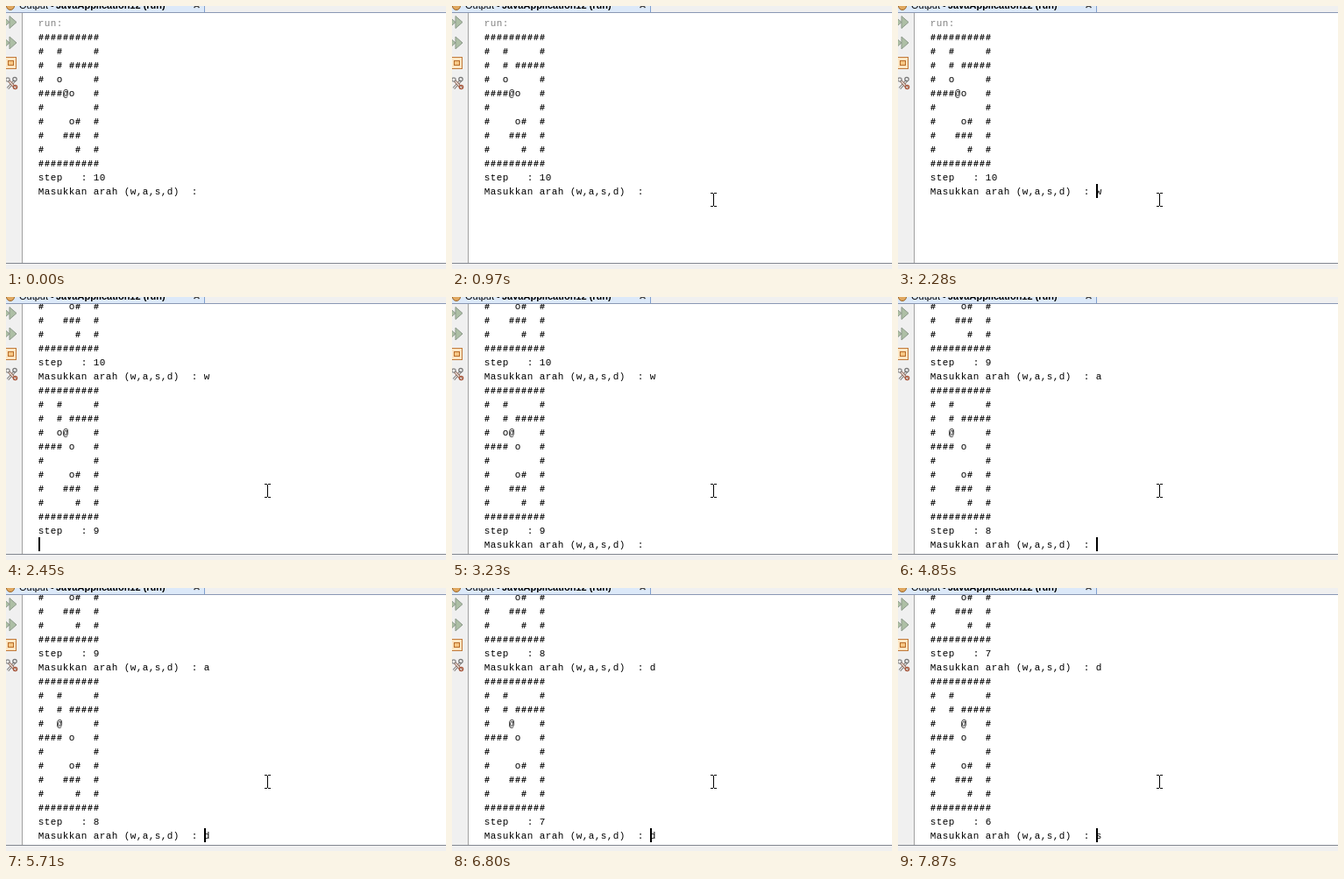
Recreate the animation shown at these times as an HTML page with a canvas. Size 502x300 px, loop 8000 ms.

```html
<!DOCTYPE html>
<html lang="id">
<head>
<meta charset="utf-8">
<title>Console puzzle</title>
<style>
html, body { margin: 0; width: 100%; height: 100%; overflow: hidden; background: #fff; }
canvas { display: block; }
</style>
</head>
<body>
<canvas id="stage" width="502" height="300"></canvas>
<script>
const ctx = document.getElementById('stage').getContext('2d');
const LOOP = 8000;
const LEFT = 37, TOP = 11, CELL = 7, LINE = 16;
const TEXT_FONT = '11px "Liberation Mono", monospace';
const WALL_FONT = 'bold 10px "Liberation Mono", monospace';
const PROMPT = 'Masukkan arah (w,a,s,d)  : ';
const END = PROMPT.length;
const KEYS = 'wadds';

// The two board rows that differ from move to move
const PLAY = [
  ['#  o     #', '####@o   #'],
  ['#  o@    #', '#### o   #'],
  ['#  @     #', '#### o   #'],
  ['#   @    #', '#### o   #'],
  ['#    @   #', '#### o   #']
];

// start time, move, stage (0 board only, 1 prompt, 2 key typed), caret column
const STATES = [
  [0, 0, 1, -1], [1350, 0, 1, END], [1810, 0, 1, -1],
  [1980, 0, 2, END + 1], [2280, 0, 2, END],
  [2450, 1, 0, 0], [2770, 1, 1, END], [3230, 1, 1, -1], [3690, 1, 1, END],
  [3770, 1, 2, END + 1], [4300, 1, 2, -1], [4470, 1, 2, END],
  [4620, 2, 0, 0], [4850, 2, 1, END], [5250, 2, 2, END + 1], [5710, 2, 2, END],
  [5940, 3, 0, 0], [6170, 3, 1, END], [6340, 3, 2, END + 1], [6800, 3, 2, END],
  [7030, 4, 0, 0], [7260, 4, 1, END], [7490, 4, 2, END + 1], [7870, 4, 2, END]
];

function rect(color, x, y, w, h) {
  ctx.fillStyle = color;
  ctx.fillRect(x, y, w, h);
}

function shape(points, fill, stroke) {
  ctx.beginPath();
  points.forEach(([x, y]) => ctx.lineTo(x, y));
  ctx.closePath();
  ctx.fillStyle = fill;
  ctx.fill();
  ctx.strokeStyle = stroke;
  ctx.lineWidth = 1;
  ctx.stroke();
}

function line(color, width, ...points) {
  ctx.beginPath();
  points.forEach(([x, y]) => ctx.lineTo(x, y));
  ctx.strokeStyle = color;
  ctx.lineWidth = width;
  ctx.stroke();
}

function consoleLines(move, stage) {
  const lines = ['run:'];
  for (let i = 0; i <= move; i++) {
    lines.push(
      '##########', '#  #     #', '#  # #####', ...PLAY[i],
      '#        #', '#    o#  #', '#   ###  #', '#     #  #', '##########',
      'step   : ' + (10 - i));
    const shown = i < move ? 2 : stage;
    lines.push(shown ? PROMPT + (shown > 1 ? KEYS[i] : '') : '');
  }
  return lines;
}

function drawConsole([, move, stage, caret]) {
  const lines = consoleLines(move, stage);
  const scroll = move ? 121 + 192 * (move - 1) : 0;
  const lineTop = row => TOP + row * LINE - scroll;
  ctx.save();
  ctx.beginPath();
  ctx.rect(19, 8, 483, 285);
  ctx.clip();
  ctx.textAlign = 'center';
  lines.forEach((text, row) => {
    const y = lineTop(row);
    if (y < -LINE) return;
    ctx.fillStyle = row ? '#000' : '#808080';
    [...text].forEach((ch, col) => {
      ctx.font = ch === '#' ? WALL_FONT : TEXT_FONT;
      ctx.fillText(ch, LEFT + (col + 0.5) * CELL - 0.4, y + 12);
    });
  });
  if (caret >= 0) {
    rect('#000', LEFT + caret * CELL, lineTop(lines.length - 1), 2, LINE);
  }
  ctx.restore();
}

function drawTab() {
  rect('#f0f0f0', 0, 0, 502, 7);
  rect('#dce9f9', 0, 0, 226, 7);
  rect('#7f9fcf', 226, 0, 1, 7);
  rect('#8a98b4', 0, 7, 502, 1);
  ctx.beginPath();
  ctx.arc(5, 0, 4.5, 0, Math.PI * 2);
  ctx.fillStyle = '#e0a860';
  ctx.fill();
  ctx.strokeStyle = '#9a6426';
  ctx.lineWidth = 1;
  ctx.stroke();
  ctx.fillStyle = '#000';
  ctx.font = '11px "Liberation Sans", sans-serif';
  ctx.fillText('Output - ', 15, 3);
  ctx.font = 'bold 11px "Liberation Sans", sans-serif';
  ctx.fillText('JavaApplication12 (run)', 57, 3);
  line('#444', 1.5, [214.5, 2], [217.5, -1], [220.5, 2]);
}

function drawArrows(y) {
  for (const x of [-4, 4]) {
    shape([[x, y - 7], [x + 8, y], [x, y + 7]], '#adbfa5', '#8c988a');
  }
}

function drawSidebar() {
  rect('#f0f0f0', 0, 8, 18, 292);
  rect('#a0a0a0', 18, 8, 1, 286);
  drawArrows(18.5);
  drawArrows(42);

  // Stop button
  rect('#c07838', 0, 58, 12, 14);
  rect('#fde6c4', 0, 59, 11, 12);
  rect('#b86c28', 2, 62, 7, 6);
  rect('#f6c684', 3, 63, 5, 4);

  // Tools icon
  for (const [color, from, to] of [['#707070', [2, 94], [10, 85]], ['#94604c', [3, 85], [11, 94]]]) {
    line(color, 3, from, to);
    line('#e8e4e0', 1.2, from, to);
  }
  ctx.lineWidth = 1.2;
  for (const [x, y, color] of [[10, 83.5, '#777'], [2, 84, '#8a8a8a'], [10.5, 92.5, '#a8553a']]) {
    ctx.beginPath();
    ctx.arc(x, y, 2.2, 0, Math.PI * 2);
    ctx.strokeStyle = color;
    ctx.stroke();
  }
}

function drawPointer(t) {
  if (t < 500) return;
  const u = Math.min(6, Math.floor((t - 500) / 78)) / 6;
  const rest = (1 - u) ** 2;
  const x = Math.round(298 + 78 * rest);
  const y = Math.round(221 + 76 * rest);
  rect('#000', x, y - 7, 1, 14);
  for (const edge of [y - 8, y + 7]) {
    rect('#000', x - 3, edge, 3, 1);
    rect('#000', x + 1, edge, 3, 1);
  }
}

function draw(now) {
  const t = now % LOOP;
  const state = STATES.filter(s => s[0] <= t).pop();
  rect('#fff', 0, 0, 502, 300);
  drawConsole(state);
  drawTab();
  drawSidebar();
  rect('#f0f0f0', 0, 294, 502, 6);
  rect('#828790', 0, 293, 502, 1);
  drawPointer(t);
}

const start = performance.now();
function tick() {
  draw(performance.now() - start);
  requestAnimationFrame(tick);
}
tick();
</script>
</body>
</html>
```
